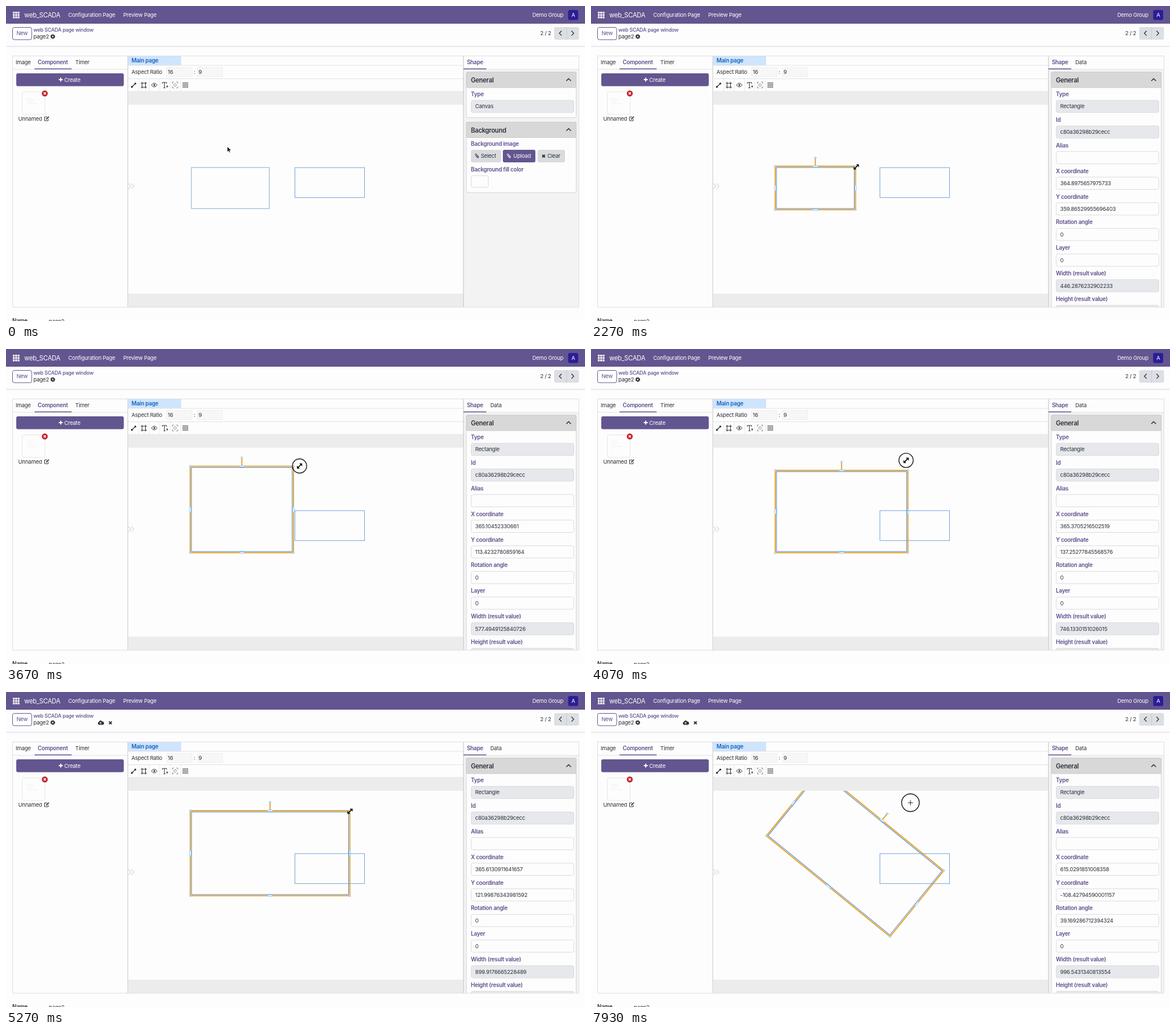
An HTML page for the animation above (8000 ms loop, 1015 px wide and 552 px high).

```html
<!DOCTYPE html>
<html lang="en">
<head>
<meta charset="utf-8">
<title>SCADA page editor</title>
<style>
  html, body { margin: 0; width: 100%; height: 100%; overflow: hidden; background: #fdfdfd; }
  svg { display: block; }
  text { font: 9.5px Inter, "Liberation Sans", sans-serif; letter-spacing: -.025em; fill: #2c3038; white-space: pre; }
  .b { font-size: 9.75px; font-weight: 600; }
  .h { font-size: 11.1px; font-weight: 600; }
  .p { fill: #5d4e8c; }
  .w { fill: #fff; }
</style>
</head>
<body>
<svg id="stage" width="1015" height="552" viewBox="0 0 1015 552"></svg>
<script>
const PURPLE = '#63558f', GREY = '#d9dbde', INK = '#2c3038', EDGE = '#e2e2e4';
const LOOP = 8000, SELECT_AT = 1100, SAVE_AT = 4900, ROTATE_AT = 7870;
const ORIGIN = [213.4, 172.9], SCALE = 0.3059, BOTTOM = 595.16;

const text = (x, y, s, cls = '', extra = '') => `<text x="${x}" y="${y}" class="${cls}" ${extra}>${s}</text>`;
const box = (x, y, w, h, fill, stroke = 'none', r = 0) =>
  `<rect x="${x}" y="${y}" width="${w}" height="${h}" rx="${r}" fill="${fill}" stroke="${stroke}"/>`;
const line = (d, stroke = INK, width = 1, extra = '') =>
  `<path d="${d}" fill="none" stroke="${stroke}" stroke-width="${width}" ${extra}/>`;
const cross = (x, y, s, stroke, width) =>
  line(`M${x - s} ${y - s}l${2 * s} ${2 * s}m0 ${-2 * s}l${-2 * s} ${2 * s}`, stroke, width);
const clip = (x, y, color) =>
  line(`M${x + 1} ${y - 2}l3 3.4q1 1.8-.8 1.4l-4-4.6q-.8-2 1.4-1.6l4 4.4q1.4 3-1.6 2.4l-3.4-3.6`, color, .9);

function navbar() {
  let s = box(0, 0, 1015, 31, PURPLE);
  for (let i = 0; i < 9; i++) s += box(12 + i % 3 * 4.2, 10 + Math.floor(i / 3) * 4.2, 3.2, 3.2, '#fff');
  return s + text(32, 19.5, 'web_SCADA', 'w', 'style="font-size:11.2px"') +
    text(109, 19, 'Configuration Page', 'w') + text(205.5, 19, 'Preview Page', 'w') +
    text(977, 19, 'Demo Group', 'w', 'text-anchor="end"') +
    box(985.5, 7, 17.5, 17.5, '#2b1d96', 'none', 3) + text(994.3, 19.2, 'A', 'w', 'text-anchor="middle"');
}

function header() {
  return box(11.5, 37.5, 33.5, 21.5, '#fff', PURPLE, 3) + text(28.2, 51.3, 'New', 'p', 'text-anchor="middle" font-weight="500"') +
    text(48, 45.2, 'web SCADA page window', 'p', 'style="font-size:8.9px;font-weight:500"') + text(48, 57, 'page2') +
    `<circle cx="82" cy="53.6" r="2.3" fill="none" stroke="${INK}" stroke-width="2"/>` +
    `<circle cx="82" cy="53.6" r="3.6" fill="none" stroke="${INK}" stroke-width="1.2" stroke-dasharray="1.5 1.33"/>` +
    `<g id="unsaved"><path d="M163 57.5a2.6 2.6 0 0 1-.3-5a3.2 3.2 0 0 1 6-.8a2.9 2.9 0 0 1 .4 5.8z" fill="${INK}"/>` +
    line('M165.8 56.5v-3.5m-1.7 1.5l1.7-1.7l1.7 1.7', '#fff') + cross(183, 54, 2.4, INK, 2) + '</g>' +
    text(936.5, 51.2, '2 / 2') + box(961, 37, 43.5, 22, '#dcdfe3', 'none', 3) + line('M982.8 37v22', '#c6c9ce') +
    line('M974 43.5l-4 4.2l4 4.2M991.3 43.5l4 4.2l-4 4.2', INK, 1.3) +
    line('M0 70.5H1015', '#dcdce0') + line('M0 72H1015', '#f4f4f5');
}

function leftPanel() {
  return text(17, 102, 'Image') + text(55.5, 102, 'Component', 'b p') + text(121.5, 102, 'Timer') +
    line('M11 111H213', EDGE) + line('M50 110.3H115', PURPLE, 1.4) +
    box(18, 118, 188.5, 22.5, PURPLE, 'none', 3) + line('M92.5 129h7m-3.5-3.5v7', '#fff', 1.8) +
    text(102, 132.5, 'Create', 'w', 'font-weight="500"') +
    box(28.5, 150.5, 40, 39.5, '#fdfdfd', '#e6e6e8', 3) + line('M37 162h7v5h-7zM37 171h17M47 162v5', '#efeff1') +
    '<circle cx="68" cy="153.2" r="5.2" fill="#c4252b"/>' + cross(68, 153.2, 1.8, '#fff', 1.5) +
    text(21.5, 200.8, 'Unnamed') +
    line('M72 194.4h-4.5v6.6h6.5v-3.2', INK, 1) + line('M70.3 198.6l4.8-4.8', INK, 1.7);
}

function toolbar() {
  let s = line('M214 127.5H802M214 149.8H802', EDGE);
  for (const x of [233, 251, 269.5, 287.5, 306]) s += line(`M${x} 128v21`, '#ebebed');
  s += line('M221.3 141.2l4.8-4.8', INK, 1.3) +
    `<circle cx="220.7" cy="141.7" r="1.7" fill="${INK}"/><circle cx="226.7" cy="135.9" r="1.7" fill="${INK}"/>` +
    line('M238.5 133v11.5m6-11.5v11.5M236.5 135.3h10.5m-10.5 7h10.5', INK, 1) +
    line('M254.8 138.5q5-6.6 10.2 0q-5.2 6.6-10.2 0z', INK, 1) + `<circle cx="260" cy="138.5" r="1.6" fill="${INK}"/>` +
    line('M274 136v-2h7.5v2M277.7 134v9.5m-1.6 0h3.2M280.7 141h3.6m-1.8-1.8v3.6', INK, 1) +
    line('M291.5 136v-2.8h2.8m4 0h2.8v2.8m0 4.8v2.8h-2.8m-4 0h-2.8v-2.8', '#8b8d92') +
    `<circle cx="296.3" cy="138.4" r="2.3" fill="none" stroke="#8b8d92"/>`;
  for (let i = 0; i < 4; i++) {
    const o = i * 2.7;
    s += line(`M309.5 ${134.5 + o}h9.8M${310.4 + o} 133.6v9.8`, '#606268', .8);
  }
  return s;
}

function canvasPanel() {
  return line('M213.5 87V528', '#d6d6d9', 1.4) + box(214, 87, 93, 17, '#cfe4fd') +
    text(220, 98.8, 'Main page', 'b', 'style="fill:#1464bd"') + line('M214 104H802', EDGE) +
    text(220, 119, 'Aspect Ratio') + box(281.5, 108, 44.5, 15.5, '#f7f7f8', '#eeeef0') + text(283.5, 119, '16') +
    text(329, 119, ':') + box(335.5, 108, 44, 15.5, '#f7f7f8', '#eeeef0') + text(337.5, 119, '9') + toolbar() +
    box(214, 150, 588, 23, '#ececec') + box(214, 504, 588, 24, '#ececec') +
    line('M214.5 311l4.5 4.8l-4.5 4.8m5.5-9.6l4.5 4.8l-4.5 4.8', '#c4c4c8') +
    '<g clip-path="url(#view)">' + '<g id="shape"></g>' + box(506.5, 283.2, 122, 52.5, 'none', '#72a3da') + '</g>';
}

const card = (y, h, title) => box(807, y, 192.5, h, '#fdfdfd', '#d4d4d6', 2) +
  box(807, y, 192.5, 27, '#d8d8d8', '#c9c9cb', 2) + text(815, y + 18, title, 'h') +
  line(`M982.3 ${y + 15.3}l4-4l4 4`, INK, 1.6);

function field(i, label, value, locked, id = '') {
  const y = 165.2 + i * 44.9;
  return text(815, y - 7.3, label, 'b p') + box(815.5, y, 180, 21.5, locked ? '#e6e8ec' : '#fdfdfd', '#d9dbe0', 3) +
    text(822.5, y + 14, value, '', id && `id="${id}"`);
}

const button = (x, w, label, textX, fill, cls) => box(x, 252, w, 22, fill, 'none', 3) + text(textX, 266.3, label, cls);

function rightPanel() {
  const idle = card(116, 79.5, 'General') + field(0, 'Type', 'Canvas', true) + card(203.5, 123.5, 'Background') +
    text(815, 244.8, 'Background image', 'b p') +
    button(815, 53, 'Select', 832.5, GREY) + clip(823.5, 262.5, INK) +
    button(871, 57, 'Upload', 889.3, PURPLE, 'w') + clip(879.5, 262.5, '#fff') +
    button(932, 48, 'Clear', 949, GREY) + cross(942.5, 263, 2.3, INK, 2) +
    text(815, 289.7, 'Background fill color', 'b p') + box(815.5, 297.2, 30, 20.5, '#fdfdfd', '#d9dbe0', 3);
  const selected = text(849, 102, 'Data') + card(116, 440, 'General') + [
    ['Type', 'Rectangle', 1], ['Id', 'c80a36298b29cecc', 1], ['Alias', '', 0], ['X coordinate', '', 0, 'x'],
    ['Y coordinate', '', 0, 'y'], ['Rotation angle', '', 0, 'angle'], ['Layer', '0', 0],
    ['Width (result value)', '', 1, 'width'], ['Height (result value)', '', 1]
  ].map((f, i) => field(i, ...f)).join('');
  return box(802, 111, 202, 417, '#f3f3f3') + line('M802 87V528', '#cfcfd2', 1.4) + line('M802 111H1004', EDGE) +
    text(808, 102, 'Shape', 'b p') + line('M802 110.3H842', PURPLE, 1.4) +
    `<g clip-path="url(#side)"><g id="idle">${idle}</g><g id="selected">${selected}</g></g>`;
}

const cursors = {
  arrow: '<path d="M0 0v9.2l2.1-2l1.5 3.3l1.6-.7l-1.5-3.2h2.9z" fill="#000" stroke="#fff" stroke-width=".6"/>',
  hand: '<path d="M-1.6 1.5v-2a1 1 0 0 1 2 0v3.6l4 .9q1.4.6 1 2.4l-.8 3.6v1.6h-5v-1.5l-3.6-4.2q-.6-1.5 1-1.2l1.4 1z" fill="#fff" stroke="#111"/>' +
    line('M1.2 7v2.6M3 7v2.6', '#111', .7),
  resize: line('M-3 3L3-3', '#000', 1.7) + '<path d="M4.6-4.6v5l-5-5zM-4.6 4.6v-5l5 5z"/>',
  plus: line('M-4.5 0h9M0-4.5v9', '#222', 1)
};

const stage = document.getElementById('stage');
stage.innerHTML = '<defs><clipPath id="view"><path d="M214 173H802V504H214z"/></clipPath>' +
  '<clipPath id="side"><path d="M802 87H1004V527.5H802z"/></clipPath></defs>' +
  navbar() + header() + leftPanel() + canvasPanel() + rightPanel() +
  line('M11.5 87.5H1004.3V527.8H11.5z', '#dedee1') +
  text(11, 555.3, 'Name', 'b') + text(75, 556, 'page2') +
  '<g id="pointer"></g>';
const $ = id => document.getElementById(id);

// Rows: time, then values; eased between rows.
const pointerTrack = [[0, 388, 246.5], [250, 388, 246.5], [800, 384, 310], [1300, 384, 310], [2050, 465, 282],
  [2650, 465, 282], [3500, 514.6, 205], [3700, 514.6, 205], [4330, 574.3, 189.3], [4800, 603, 209],
  [5400, 603, 209], [6300, 464.6, 194], [7710, 464.6, 194], [7930, 560, 194]];
const shapeTrack = [[2650, 364.8975657975733, 359.86529955696403, 446.2876232902233],
  [3500, 365.10452330661, 113.4232780859164, 577.4949125840726],
  [3700, 365.10452330661, 113.4232780859164, 577.4949125840726],
  [4330, 365.52545427005265, 151.13243977344052, 844.3574726827267],
  [4850, 365.6130911641657, 121.99876343981592, 899.9176665228489]];
const turned = { x: '615.0291851008358', y: '-108.42794590001157', angle: '39.169286712394324', width: '996.5431340813554' };
const cursorTimes = [[0, 'arrow'], [550, 'hand'], [2000, 'resize'], [5500, 'arrow'], [7000, 'plus']];
const presses = [[852, 1150], [2450, 4850], [7708, LOOP]];

function sample(track, t) {
  const next = track.findIndex(row => row[0] > t);
  if (next === 0) return track[0].slice(1);
  if (next < 0) return track[track.length - 1].slice(1);
  const a = track[next - 1], b = track[next], k = (t - a[0]) / (b[0] - a[0]), e = k * k * (3 - 2 * k);
  return a.slice(1).map((v, i) => v === b[i + 1] ? v : v + (b[i + 1] - v) * e);
}

function shapeMarkup(x, y, w, h, angle, active) {
  if (!active) return box(x, y, w, h, 'none', '#86a9d4');
  const m = 2.2, l = x - m, t = y - m, r = x + w + m, b = y + h + m, cx = x + w / 2, cy = y + h / 2;
  const dot = (px, py) => `<circle cx="${px}" cy="${py}" r="1.5" fill="#fff" stroke="#6aa5df" stroke-width=".8"/>`;
  const bar = (px, py, bw, bh) =>
    `<rect x="${px - bw / 2}" y="${py - bh / 2}" width="${bw}" height="${bh}" rx="1" fill="#fff" stroke="#7fb8ea" stroke-width=".8"/>`;
  return `<g transform="rotate(${angle} ${cx} ${cy})">` + box(x, y, w, h, 'none', '#3f7fcf') +
    line(`M${l} ${t}H${r}V${b}H${l}z M${cx} ${t}v-15`, '#e8a11c', 1.9) +
    dot(l, t) + dot(r, t) + dot(l, b) + dot(r, b) + dot(cx, t - 15) +
    bar(cx, t, 9, 2.4) + bar(cx, b, 9, 2.4) + bar(l, cy, 2.4, 9) + bar(r, cy, 2.4, 9) + '</g>';
}

function draw(now) {
  const t = now % LOOP;
  const active = t >= SELECT_AT, rotated = t >= ROTATE_AT;
  const [x, y, width] = sample(shapeTrack, t);
  $('shape').innerHTML = shapeMarkup(ORIGIN[0] + x * SCALE, ORIGIN[1] + y * SCALE, width * SCALE,
    (BOTTOM - y) * SCALE, rotated ? turned.angle : 0, active);
  const values = rotated ? turned : { x, y, angle: 0, width };
  for (const id in values) $(id).textContent = values[id];
  $('idle').style.display = active ? 'none' : '';
  $('selected').style.display = active ? '' : 'none';
  $('unsaved').style.display = t >= SAVE_AT ? '' : 'none';

  const kind = cursorTimes.filter(c => c[0] <= t).pop()[1];
  const press = presses.find(p => t >= p[0] && t < p[1]);
  const ring = press ? `<circle r="${Math.max(12.5, 24 - 11.5 * (t - press[0]) / 300)}" fill="none" stroke="#111" stroke-width="1.4"/>` : '';
  $('pointer').setAttribute('transform', `translate(${sample(pointerTrack, t)})`);
  $('pointer').innerHTML = ring + cursors[kind];
  requestAnimationFrame(draw);
}
requestAnimationFrame(draw);
</script>
</body>
</html>
```
